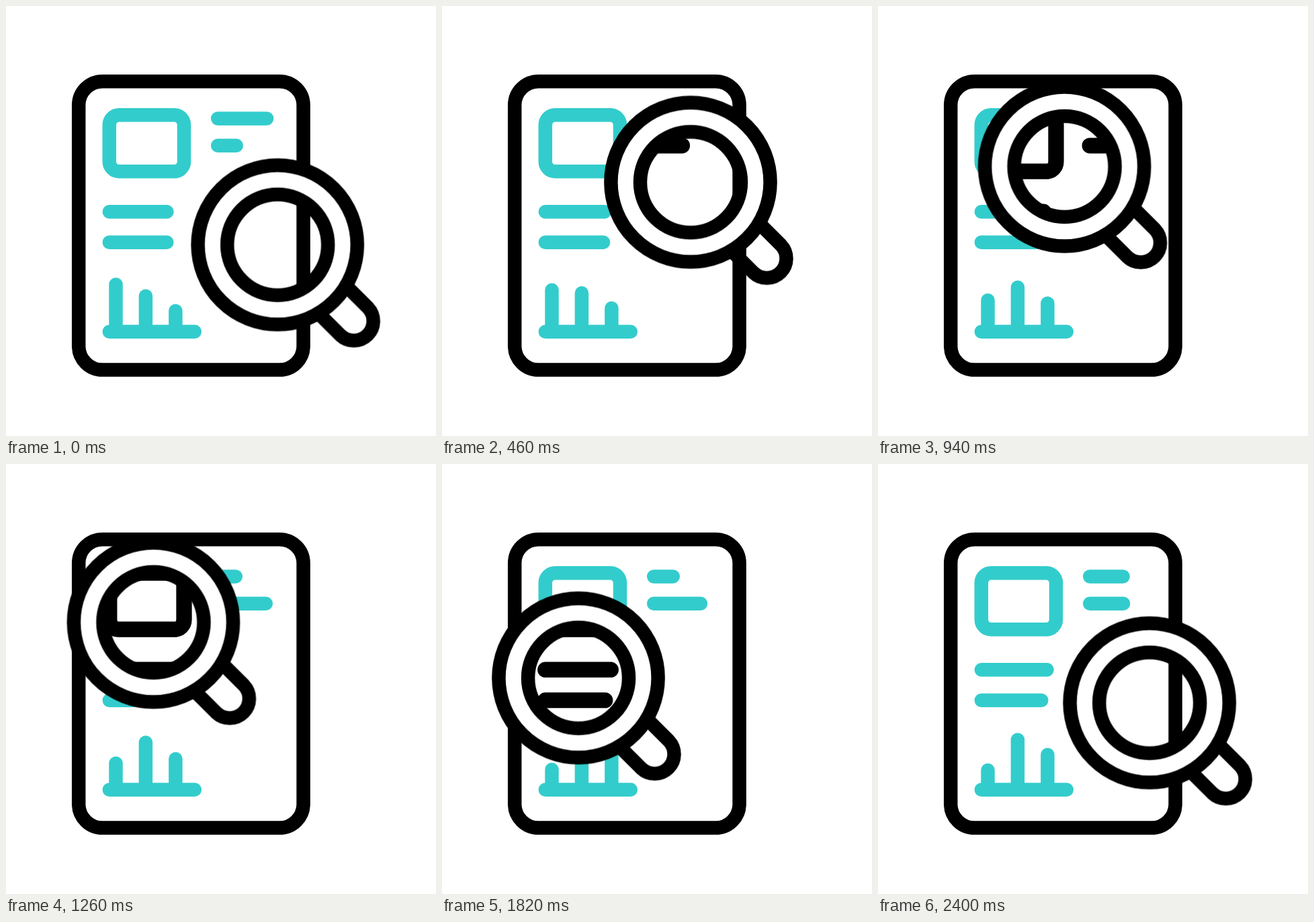
Animation, 640 px wide and 640 px high, one loop 2420 ms. Source, as an HTML page without scripts:

```html
<!DOCTYPE html>
<html lang="en">
<head>
<meta charset="utf-8">
<title>Report review</title>
<style>
  html, body { margin: 0; height: 100%; overflow: hidden; background: #fff; }
  svg { display: block; width: 100%; height: 100%; fill: none; }

  .lens, .bar, .swing, .drift {
    animation: 2.42s cubic-bezier(.3333, 0, .6667, 1) infinite;
  }
  .lens  { animation-name: lens; }
  .bar   { animation-name: bar; }
  .swing { animation-name: swing; }
  .drift { animation-name: drift; }

  /* Motion ends at 2400 ms, then rests for one tick. */
  @keyframes lens {
    0%, 99.174%, 100% { transform: translate(404.2px, 355.5px); }
    24.793% { transform: translate(364.6px, 247.6px); }
    49.587% { transform: translate(220px, 233.2px); }
    74.38%  { transform: translate(202.3px, 318.3px); }
  }
  /* Dash length sets how much of each stroke is drawn. */
  @keyframes bar {
    0%, 99.174%, 100% { stroke-dasharray: var(--a) 999; }
    33.058% { stroke-dasharray: var(--b) 999; }
    66.116% { stroke-dasharray: var(--c) 999; }
  }
  @keyframes swing {
    0%, 49.587%, 99.174%, 100% { stroke-dasharray: var(--a) 999; }
    24.793%, 74.38% { stroke-dasharray: var(--b) 999; }
  }
  @keyframes drift {
    0%, 86.777%, 100% { stroke-dasharray: 85.5 999; }
    33.058% { stroke-dasharray: 89.1 999; }
    66.116% { stroke-dasharray: 98 999; }
  }
</style>
</head>
<body>
<svg viewBox="0 0 640 640">
  <defs>
    <clipPath id="glass"><circle class="lens" r="72"/></clipPath>
    <g id="notes" stroke-linecap="round">
      <rect x="153.8" y="162.2" width="111.2" height="84" rx="14.5"/>
      <path class="swing" d="M315.2 167.5h120" style="--a:73.9;--b:24.9"/>
      <path class="swing" d="M315.2 207.8h120" style="--a:26.6;--b:73.2"/>
      <path class="bar" d="M153.8 306.2h120" style="--a:85.5;--b:98;--c:91.8"/>
      <path class="drift" d="M153.8 351.7h120"/>
      <path class="bar" d="M163.5 484.7v-120" style="--a:70.7;--b:28.2;--c:47"/>
      <path class="bar" d="M207.9 484.7v-120" style="--a:52.7;--b:76.4;--c:26.2"/>
      <path class="bar" d="M252.4 484.7v-120" style="--a:30.7;--b:51.1;--c:69.3"/>
      <path d="M153.8 484.7h127"/>
    </g>
  </defs>

  <g stroke-width="20.5">
    <use href="#notes" stroke="#3cc"/>
    <g clip-path="url(#glass)">
      <use href="#notes" stroke="#000" stroke-width="23.3"/>
    </g>
    <rect x="108.2" y="112.2" width="334.4" height="429.4" rx="35.5" stroke="#000"/>
    <g class="lens" stroke="#000">
      <circle r="97" stroke="#fff" stroke-width="40"/>
      <path d="M101.7 60.7L134.5 93.5A29 29 0 0 1 93.5 134.5L60.7 101.7"/>
      <circle r="118.6"/>
      <circle r="75"/>
    </g>
  </g>
</svg>
</body>
</html>
```
